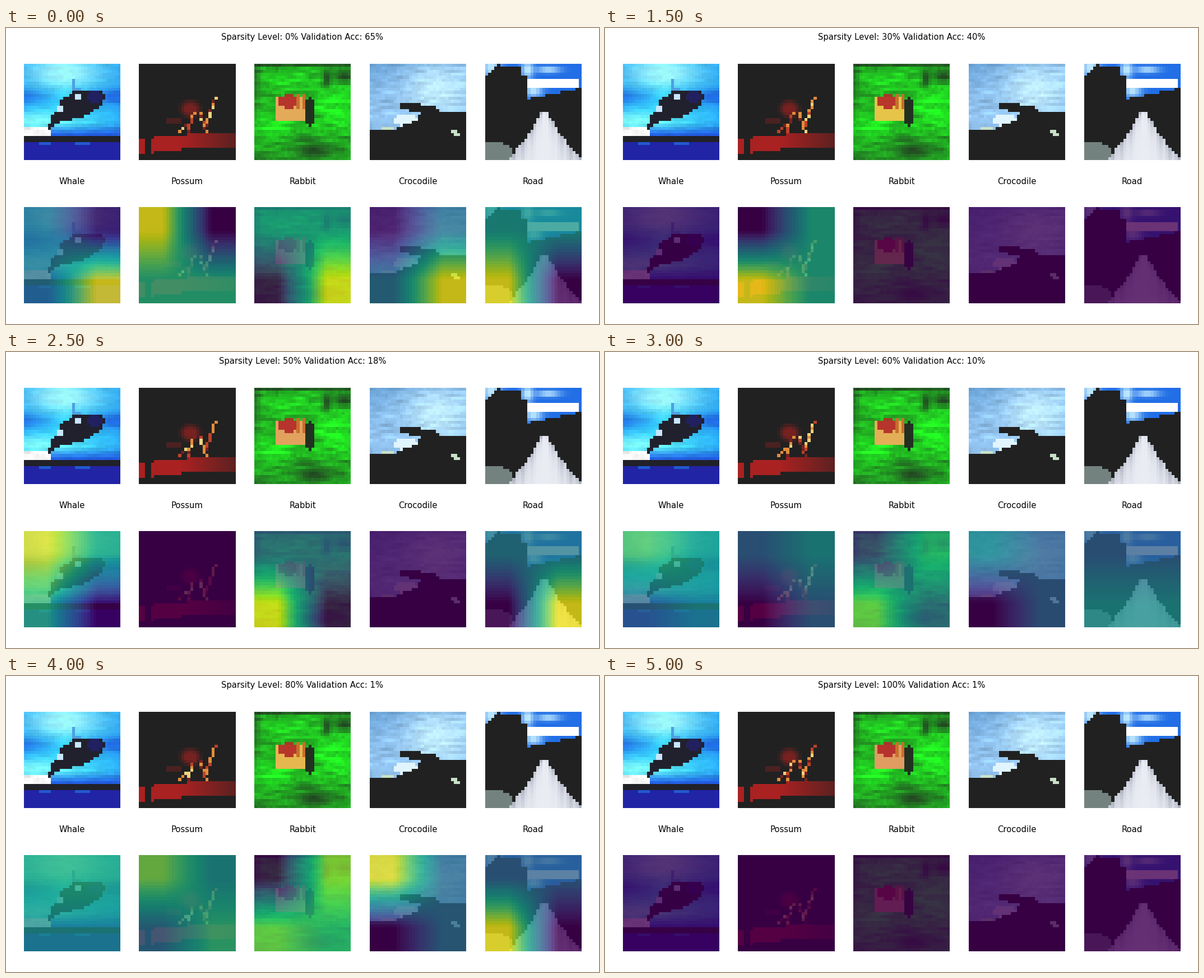
Write a matplotlib script that moves like this. It is 1058 by 529 pixels and loops after 5500 ms.

```python
import matplotlib.pyplot as plt
import numpy as np
from matplotlib.animation import FuncAnimation
from matplotlib.colors import to_rgb
from matplotlib.path import Path

W, H, DPI = 1058, 529, 92
N, SIDE = 32, 172           # cells and pixels per picture side
FRAMES, INTERVAL = 11, 500
SHADE = 33 / 255            # darkest tone in the top row

centers = np.arange(N) + 0.5
X, Y = np.meshgrid(centers, centers)


# --- painting helpers, in cell units --------------------------------------

def rgb(color):
    return np.array(to_rgb(color))


def blend(img, color, weight):
    """Mix a colour into the picture by a mask or a 0..1 weight field."""
    weight = np.clip(weight, 0, 1)[..., None]
    img[:] = (1 - weight) * img + weight * rgb(color)


def flat(color):
    return np.tile(rgb(color), (N, N, 1))


def box(x, y, w, h):
    return (X > x) & (X < x + w) & (Y > y) & (Y < y + h)


def oval(x, y, rx, ry):
    return ((X - x) / rx) ** 2 + ((Y - y) / ry) ** 2 < 1


def glow(x, y, rx, ry):
    return np.exp(-((X - x) / rx) ** 2 - ((Y - y) / ry) ** 2)


def outline(*points):
    cells = np.column_stack([X.ravel(), Y.ravel()])
    return Path(points).contains_points(cells).reshape(N, N)


def textured(img, seed, strength):
    """Soft light and dark streaks along the rows."""
    noise = np.random.default_rng(seed).normal(size=(N, N))
    noise = sum(np.roll(noise, k, axis=1) for k in range(4)) / 2
    return img * (1 + strength * noise[..., None])


# --- the five pictures ----------------------------------------------------

def paint_whale(rng):
    img = flat("#35dcff")
    blend(img, "#a0ffff", 1.2 * glow(13, 3, 14, 5))
    blend(img, "#216ee6", (0.35 + 0.7 * glow(16, 11, 40, 2.5))
          * np.abs(X - 14) / 14)
    blend(img, "#80ffff", glow(4, 19, 14, 3))
    blend(img, "#2150e0", (Y - 20) / 4 * (X > 9))
    blend(img, "white", oval(4, 22.5, 5.5, 1.9))
    blend(img, "#21212a", Y > 24)
    img = textured(img, 1, 0.03)
    blend(img, "#2124a5", Y > 26)
    blend(img, "#2159d2", box(5, 26, 4, 1) | box(17, 26, 5, 1))
    blend(img, "#21212d", outline((8, 22), (9, 18), (13, 11.5), (17, 9),
                                  (25, 8.8), (27.2, 10.3), (25, 14.5),
                                  (20, 17.4), (11, 19.8)))
    blend(img, "#21216e", 0.8 * oval(23.5, 11, 3, 2))
    blend(img, "#4ba0e1", box(16, 5, 1, 3) | box(16, 8, 3, 1))
    blend(img, "#c8e6ff", box(17, 10, 2, 2) | box(11, 14, 2, 2))
    return img


def paint_possum(rng):
    img = flat("black")
    floor = outline((0, 25), (18, 23.3), (32, 22.8), (32, 28), (18, 28),
                    (0, 30))
    blend(img, "#aa2121", floor)
    blend(img, "black", 0.35 * floor * (X - 14) / 14)
    blend(img, "black", box(2, 25, 2, 5))
    blend(img, "#782121", 1.2 * glow(17, 15, 3.5, 3) * (Y < 19))
    blend(img, "#4b2121", oval(11.5, 19, 2.5, 1.2))
    # lit limbs: sloping strokes of random ember tones
    embers = ["#be4128", "#e28c3c", "#e28c3c", "#f0d27c", "#782121"]
    for (x0, y0), (x1, y1) in [((13, 22), (15, 20)), ((16, 22), (18, 16)),
                               ((22, 20), (25, 11)), ((20, 16), (22, 22))]:
        for y in np.arange(min(y0, y1), max(y0, y1) + 1):
            x = x0 + (x1 - x0) * (y - y0) / (y1 - y0)
            blend(img, rng.choice(embers), box(np.floor(x), y, 1, 1))
    return img


def paint_rabbit(rng):
    img = flat("#21af21")
    blend(img, "#21eb21", glow(27, 15, 8, 8) + glow(7, 21, 7, 4)
          + 0.6 * glow(10, 6, 9, 3))
    blend(img, "#214621", glow(20, 29, 7, 2.5) + glow(30, 4, 3, 2)
          + glow(24, 5, 1.5, 3) + 0.6 * glow(0, 6, 2, 9)
          + 0.6 * glow(2, 32, 6, 3) + 0.5 * glow(18, 25, 7, 1) + (Y < 1) * 0.8)
    img = textured(img, 3, 0.09)
    fur = rng.uniform()
    blend(img, "#e6c846", box(7, 11, 10, 8))
    blend(img, "#e19a64", fur * box(7, 11, 10, 8))
    blend(img, "#b22828", 0.9 * oval(11.5, 12.5, 3.8, 2.3))
    blend(img, "#c86e2d", box(14, 10, 4, 5) & (np.floor(X) % 2 == 0))
    blend(img, "#213021", oval(18.4, 16, 1.6, 5))
    return img


def paint_crocodile(rng):
    img = flat("#96c8f5")
    blend(img, "#6ea5d7", glow(0, 0, 14, 9) + 0.5 * (Y < 1))
    blend(img, "#beebff", 1.1 * glow(22, 9, 9, 8))
    img = textured(img, 4, 0.045)
    blend(img, "#e1f5ff", oval(12, 18.8, 4.5, 2))
    blend(img, "black", outline((0, 22), (9, 21.6), (16, 18.5), (17, 16.5),
                                (10, 14.5), (10, 13), (21, 13.8),
                                (23, 15.8), (32, 16.4), (32, 32), (0, 32)))
    blend(img, "#c8e1c8", box(4, 21, 4, 1) | box(27, 22, 2, 1)
          | box(28, 23, 2, 1))
    return img


def paint_road(rng):
    img = flat("black")
    treeline = np.where(X < 5, 5 - X, np.where(X < 12, 1, 14.5 - 0.2 * X))
    treeline[(X > 12) & (X < 14)] = 4
    sky = Y < treeline
    blend(img, "#216ee6", sky)
    blend(img, "#c0ebff", sky * (glow(2, 1, 3, 4) + glow(14, 2, 2, 3)
                                 + glow(16, 9, 3, 2) + glow(21, 2, 4, 1)))
    blend(img, "white", box(14, 5, 17, 3))
    blend(img, "#74827f", oval(3, 30, 6, 4))
    depth = Y - 16
    edge = np.abs(X - 19.7) / (1 + 0.5 * depth + 0.013 * depth ** 2)
    road = (depth > 0) & (edge < 1)
    blend(img, "#ebedf5", road)
    blend(img, "#aab0be", road * edge ** 2 * (0.7 + 0.3 * np.cos(2 * X)))
    return img


SCENES = {"Whale": paint_whale, "Possum": paint_possum,
          "Rabbit": paint_rabbit, "Crocodile": paint_crocodile,
          "Road": paint_road}


# --- heat over the pictures -----------------------------------------------

# Hot corner, cold corner and the level of the two others, per picture;
# steps left out lie halfway between their neighbours.
TL, TR, BL, BR = range(4)
HEAT = {
    0: [(BR, TR, .38), (TL, TR, .64), (BR, BL, .5), (BR, TL, .37),
        (BL, BR, .53)],
    1: [(TL, TR, .46), (BR, TL, .2), (BR, BL, .4), (BR, TL, .6),
        (BR, TL, .5)],
    3: [None, (BL, TL, .6), None, None, None],
    5: [(TL, BR, .65), None, (BL, BR, .3), None, (BR, BL, .41)],
    7: [(BR, BL, .52), (TR, BL, .62), (TR, TL, .6), (TL, BL, .6),
        (BL, BR, .2)],
    9: [(BL, BR, .76), (TL, TR, .71), (BL, TL, .7), (TL, BL, .08),
        (BL, BR, .43)],
    10: [None] * 5,
}
viridis = plt.get_cmap("viridis")
ramp = np.clip(centers / 16 - 0.5, 0, 1)
WEIGHTS = np.stack([1 - ramp, ramp])


def quadrants(step, col):
    if step not in HEAT:
        return (quadrants(step - 1, col) + quadrants(step + 1, col)) / 2
    if HEAT[step][col] is None:
        return np.zeros(4)
    hot, cold, middle = HEAT[step][col]
    levels = np.full(4, middle)
    levels[hot], levels[cold] = 0.985, 0
    return levels


def overlay(img, corners):
    heat = WEIGHTS.T @ corners.reshape(2, 2) @ WEIGHTS
    contrast = (img - SHADE) / (1 - SHADE)
    return 0.8 * viridis(heat)[..., :3] + 0.2 * contrast


def accuracy(level):
    return int(np.interp(level, [0, 10, 30, 50, 70, 90, 100],
                         [65, 57, 40, 18, 3, 0, 1]))


# --- stage ----------------------------------------------------------------

plt.rcParams.update({"font.family": "DejaVu Sans", "font.size": 11.5})
fig = plt.figure(figsize=(W / DPI, H / DPI), dpi=DPI, facecolor="white")


def picture(left, top):
    ax = fig.add_axes([left / W, 1 - (top + SIDE) / H, SIDE / W, SIDE / H])
    ax.axis("off")
    return ax.imshow(np.ones((N, N, 3)), interpolation="nearest",
                     aspect="auto")


title = fig.text(0.5, 1 - 21 / H, "", ha="center")
photos, maps = [], []
for col, name in enumerate(SCENES):
    left = 32 + int(205.75 * col)
    photos.append(picture(left, 64))
    maps.append(picture(left, 320))
    fig.text((117.6 + 205.67 * col) / W, 1 - 279 / H, name, ha="center")


def update(step):
    level = 10 * step
    title.set_text(f"Sparsity Level: {level}% "
                   f"Validation Acc: {accuracy(level)}%")
    for col, paint in enumerate(SCENES.values()):
        img = np.clip(paint(np.random.default_rng(step)), SHADE, 1)
        photos[col].set_data(img)
        maps[col].set_data(overlay(img, quadrants(step, col)))
    return [title, *photos, *maps]


anim = FuncAnimation(fig, update, frames=FRAMES, interval=INTERVAL,
                     repeat=True, repeat_delay=0, blit=False)
plt.show()
```
